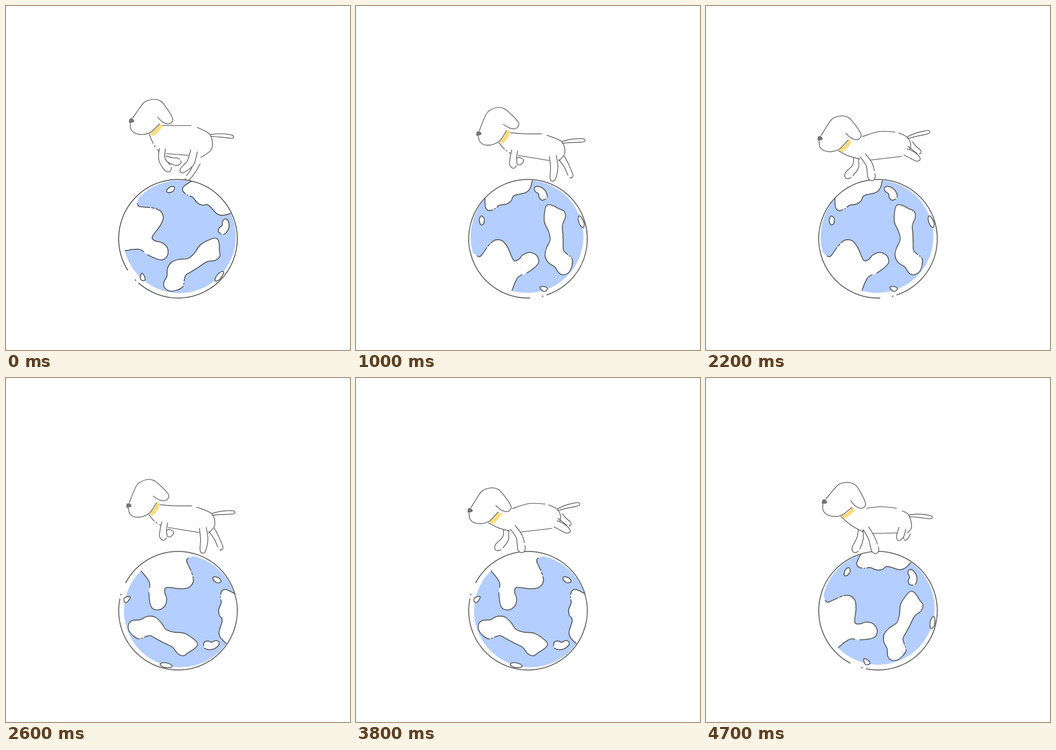
Animation, 748 px wide and 748 px high, one loop 4.8 s. Source, as an HTML page:

```html
<!DOCTYPE html>
<html lang="en">
<head>
<meta charset="utf-8">
<title>Dog running on a globe</title>
<style>
html, body { margin: 0; width: 100%; height: 100%; overflow: hidden; background: #fff; }
svg { display: block; width: 100vw; height: 100vh; }
path, circle { fill: none; stroke-linecap: round; stroke-linejoin: round; }
#globe {
  stroke: #424242; stroke-width: 1.75;
  transform-origin: 374px 506px;
  animation: spin 1.2s steps(12) -1ms infinite;
}
#globe .sea { fill: #b3ceff; stroke: none; }
#globe .rim { stroke-linecap: butt; }
.pose { stroke: #666; stroke-width: 1.7; visibility: hidden; animation: show .8s step-end infinite; }
.fill { fill: #fff; stroke: none; }
.nose { fill: #777; }
.collar { stroke: #fedb79; stroke-width: 8; stroke-linecap: butt; }
@keyframes spin { to { transform: rotate(360deg); } }
@keyframes show { 0% { visibility: visible; } 12.5%, 100% { visibility: hidden; } }
</style>
</head>
<body>
<svg viewBox="0 0 748 748">
  <clipPath id="disc"><circle cx="374" cy="506" r="129"/></clipPath>
  <g id="globe">
    <circle class="sea" cx="377" cy="501.7" r="122.6"/>
    <g id="land" clip-path="url(#disc)"></g>
    <circle class="rim" cx="374" cy="506" r="129" pathLength="360"
      stroke-dasharray="131.8 3.2 1.5 11.3 212.2 0"/>
  </g>
  <g id="dog"></g>
</svg>
<script>
const byId = id => document.getElementById(id);

function add(parent, tag, attrs) {
  const el = document.createElementNS('http://www.w3.org/2000/svg', tag);
  for (const k in attrs) el.setAttribute(k, attrs[k]);
  return parent.appendChild(el);
}

const numbers = s => s.split(/[ ,]+/).map(Number);
const pairs = v => v.flatMap((x, i) => i % 2 ? [] : [[x, v[i + 1]]]);

// Smooth path through points.
function curve(pts, closed) {
  const n = pts.length;
  const at = i => closed ? pts[(i + n) % n] : pts[Math.max(0, Math.min(n - 1, i))];
  let d = `M${pts[0]}`;
  for (let i = 0; i < (closed ? n : n - 1); i++) {
    const [a, b, c, e] = [at(i - 1), at(i), at(i + 1), at(i + 2)];
    d += `C${b.map((v, k) => v + (c[k] - a[k]) / 6)} ${c.map((v, k) => v - (e[k] - b[k]) / 6)} ${c}`;
  }
  return d;
}

// Dashes are in percent of the line.
function line(parent, d, dash, cls = '') {
  const el = add(parent, 'path', { class: cls, d });
  if (dash) {
    el.setAttribute('pathLength', 100);
    el.setAttribute('stroke-dasharray', dash);
  }
}

// Coasts; an open coast names the far side of its white area.
function coast(text, dash, rest = '') {
  const d = curve(pairs(numbers(text)), !rest);
  add(byId('land'), 'path', { class: 'fill', d: d + rest });
  line(byId('land'), d, dash);
}

coast('259,532 290,529 308,541 331,551 343,551 352,540 350,524 338,514 325,511 318,502 335,478 342,460 335,445 318,439 297,437 288,435 286,429',
  '14.8 3.9 65.5 1.4 2.1 1.4 20', 'L288 418 240 400V535Z');
coast('403,381 386,393 385,403 396,412 406,416 416,428 427,433 440,433 459,452 473,455 488,451',
  '25 3 1 3 100', 'L520 440 440 350Z');
coast('464,532 465,544 455,553 437,556 420,567 404,577 391,585 388,594 383,612 361,620 346,614 343,602 350,587 351,571 360,557 376,551 396,549 410,537 423,519 443,508 457,505 463,514',
  '30 1.2 .6 1.2 100');
coast('477,463 483,467 485,479 481,490 472,497 462,491 464,482 470,477 471,468', '47 6 100');
coast('349,402 356,394 366,393 364,402 354,406');
coast('456,598 455,592 461,583 470,577 473,581 465,594');
coast('296,581 302,590 301,597 293,595 292,588');

// Key poses of the run, in steps of 100 ms: gathered, push off, landing, rolling over.
const keyTimes = [0, 2, 6, 7];
const period = 8;

// Cyclic spline through four key values, with unequal spacing in time.
function blend(v, t) {
  const mod = i => (i + 4) % 4;
  const span = i => (keyTimes[mod(i + 1)] - keyTimes[mod(i)] + period) % period;
  const slope = i => (v[mod(i + 1)] - v[mod(i)]) / span(i);
  const tangent = i => (slope(i - 1) * span(i) + slope(i) * span(i - 1)) / (span(i - 1) + span(i));
  const i = keyTimes.filter(k => k <= t).length - 1;
  const h = span(i), s = (t - keyTimes[i]) / h, r = 1 - s;
  return v[i] * (1 + 2 * s) * r * r + v[mod(i + 1)] * s * s * (3 - 2 * s) +
    h * s * r * (tangent(i) * r - tangent(i + 1) * s);
}

// A track gives its numbers at any step.
function track(...keys) {
  const rows = keys.map(numbers);
  return t => rows[0].map((_, i) => blend(rows.map(r => r[i]), t));
}

// nose x, y, angle
const headTrack = track('272.5,249.5,0', '266.5,277.5,-12.8', '247.5,288,-3.2', '257,269,5.2');
const tailTrack = track('4', '-4.6', '-14.6', '4.6');
const backTrack = track(
  '338,260 370,260 402,260 416,264 444,280 447,311 424,329',
  '331,275 366,278 404,278 415,281 447,295 454,320 441,337',
  '340,284 376,273 411,274 419,276 437,285 445,300 443,312',
  '349,283 382,280 414,283 427,289 441,298 447,324 438,337');

// hip, knee, foot; half widths at these joints
const legs = {
  farFront: { joints: track('346,331 362,337 373,339', '346,338 351,338 357,337',
    '326,330 325,349 309,368', '336,330 335,349 325,372'), widths: [5, 7, 8], dash: '57 5 100' },
  farHind: { joints: track('416,340 406,360 395,374', '447,330 458,348 467,369',
    '444,300 453,309 463,317', '438,337 436,343 434,348'), widths: [7, 5.5, 5], dash: '38 7 100' },
  nearFront: { joints: track('340,310 339,333 352,353', '345,314 342,331 342,345',
    '341,325 355,345 360,372', '348,327 360,348 368,374'), widths: [6.5, 7, 8], dash: '62 5 100' },
  nearHind: { joints: track('409,315 401,341 384,357', '428,326 431,350 428,375',
    '434,317 448,324 460,332', '427,327 423,341 420,348'), widths: [7.5, 8, 6] }
};

// Outline of a limb: down one side, around the foot, up the other.
function limb(joints, widths) {
  const dir = (a, b) => {
    const len = Math.hypot(b[0] - a[0], b[1] - a[1]);
    return [(b[0] - a[0]) / len, (b[1] - a[1]) / len];
  };
  const dirs = joints.map((_, i) => dir(joints[Math.max(0, i - 1)], joints[Math.min(2, i + 1)]));
  const side = k => joints.map(([x, y], i) =>
    [x - dirs[i][1] * widths[i] * k, y + dirs[i][0] * widths[i] * k]);
  const tip = joints[2].map((v, k) => v + dirs[2][k] * widths[2]);
  return [...side(1), tip, ...side(-1).reverse()];
}

function drawLeg(parent, { widths, dash }, joints) {
  const d = curve(limb(joints, widths));
  add(parent, 'path', { class: 'fill', d });
  line(parent, d, dash);
}

const shape = (text, closed) => curve(pairs(numbers(text)), closed);
const tail = shape('0,-2 18,-5 38,-5 49,-3 49,2 41,3 20,2 0,2');
const head = {
  collar: shape('43,30 55,22 65,9'),
  skull: shape('3,-6 25,-37 36,-44 50,-46.5 63,-43 73,-33 89,-7 88,3 79,7 67,2 57,-8'),
  jaw: shape('-2,5 -1,18 8,27 24,30 42,25 61,7'),
  nose: shape('-4,3 -2,-4 3,-3 5,2', true)
};

const place = (x, y, angle) => ({ transform: `translate(${x} ${y}) rotate(${angle})` });

function drawDog(pose, t) {
  const joints = {};
  for (const name in legs) joints[name] = pairs(legs[name].joints(t));
  const leg = name => drawLeg(pose, legs[name], joints[name]);
  const [front, hind] = [joints.nearFront[0], joints.nearHind[0]];
  const [x, y, angle] = headTrack(t);
  const back = pairs(backTrack(t));

  leg('farFront');
  leg('farHind');

  const [tx, ty] = back[4];
  line(add(pose, 'g', place(tx + 1, ty + 1.5, tailTrack(t)[0])), tail);
  line(pose, curve(back.slice(0, 3)));
  line(pose, curve(back.slice(3)));

  // chest runs from the collar to the shoulder, belly from shoulder to hip
  const a = angle * Math.PI / 180;
  const throat = [x + 39 * Math.cos(a) - 29 * Math.sin(a), y + 39 * Math.sin(a) + 29 * Math.cos(a)];
  const shoulder = [front[0] - 6, front[1] + 8];
  const chest = [(throat[0] + shoulder[0]) / 2 - 2, (throat[1] + shoulder[1]) / 2 + 2];
  line(pose, curve([throat, chest, shoulder]), t < 4 && '48 12 6 16 100');
  line(pose, curve([[front[0] + 8, front[1] + 11], [hind[0] - 8, hind[1] + 10]]));

  leg('nearFront');
  leg('nearHind');

  const group = add(pose, 'g', place(x, y, angle));
  for (const part in head) line(group, head[part], '', part);
}

for (let t = 0; t < period; t++) {
  drawDog(add(byId('dog'), 'g', {
    class: 'pose', style: `animation-delay:${(t - period) * 100 - 1}ms`
  }), t);
}
</script>
</body>
</html>
```
